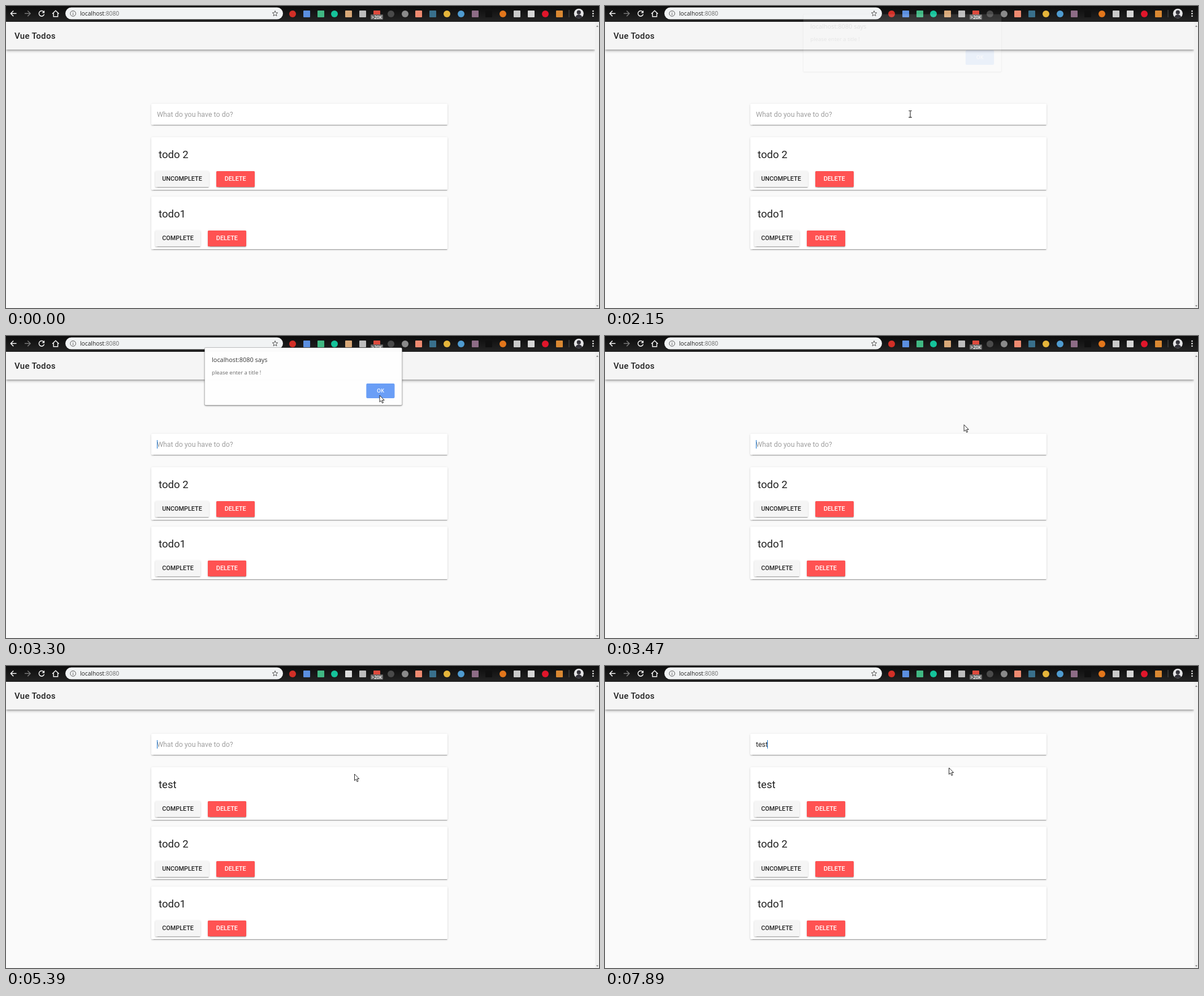
Write an HTML page with a canvas that moves like this. It is 1049 px wide and 534 px high and loops after 8 s.

```html
<!DOCTYPE html>
<html lang="en">
<head>
<meta charset="utf-8">
<title>Vue Todos</title>
<style>
  html, body { margin: 0; width: 100%; height: 100%; overflow: hidden; background: #fafafa; }
  #stage { position: relative; width: 1049px; height: 534px; overflow: hidden;
    font-family: Roboto, sans-serif; color: rgba(0,0,0,.87); white-space: nowrap; }
  #stage * { box-sizing: border-box; }
  .abs, #chrome, #bar, #app, #dialog, #dialog > *, #cursor, #cursor svg { position: absolute; left: 0; top: 0; }
  .ui { font-family: "Open Sans", sans-serif; }
  #stage #url { left: 131px; top: 3px; font-size: 10.25px; line-height: 20px; color: #222; }
  #url span { color: #6b6b6b; }
  .ext { position: absolute; width: 12px; height: 12px; top: 7.5px; }
  #stage #badge { left: 645px; top: 15px; width: 22px; height: 9px; background: #666; color: #fff;
    font-size: 8px; font-weight: 600; line-height: 9px; text-align: center; border-radius: 1px; }
  #stage #bar { top: 28px; width: 1042px; height: 49.4px; padding-left: 15px; background: #f5f5f5;
    font-size: 15px; font-weight: 500; letter-spacing: .3px; line-height: 50px;
    box-shadow: 0 1.5px 3px -.8px rgba(0,0,0,.3), 0 3px 4px rgba(0,0,0,.14), 0 .8px 7.8px rgba(0,0,0,.12); }
  #stage #scroll { left: 1042px; top: 28px; width: 7px; height: 506px; background: #f1f1f1; }
  #scroll i { position: absolute; left: 1.5px; border: 2.5px solid transparent; }
  #scroll i:first-child { top: 4px; border-bottom: 3px solid #8a8a8a; }
  #scroll i:last-child { bottom: 0; border-top: 3px solid #8a8a8a; }
  #stage #app { left: 257.2px; width: 523.6px; }
  .lift { border-radius: 1.5px;
    box-shadow: 0 2.3px .8px -1.5px rgba(0,0,0,.2), 0 1.5px 1.5px rgba(0,0,0,.14), 0 .8px 3.9px rgba(0,0,0,.12); }
  #field { position: relative; height: 37.2px; padding-left: 9.8px; margin-bottom: 22px;
    background: #fff; font-size: 12.4px; line-height: 37.2px; }
  #field.empty { color: rgba(0,0,0,.38); }
  #caret { position: absolute; top: 11.6px; width: 1px; height: 15px; background: #1976d2; }
  .card { height: 92.9px; margin-bottom: 12.4px; background: #fff; }
  .card h2 { margin: 0; padding-left: 12.8px; height: 60.4px; font-size: 18.6px; font-weight: 400; line-height: 62px; }
  .row { display: flex; padding-left: 6.6px; }
  .btn { height: 27.9px; min-width: 68.2px; padding: 0 12.4px; margin-right: 12.4px; background: #f5f5f5;
    font-size: 10.85px; font-weight: 500; line-height: 27.9px; text-align: center; }
  .btn.red { background: #ff5252; color: #fff; }
  #stage #dialog { left: 352px; top: 25px; width: 347.5px; height: 101px; background: #fff; border-radius: 2px;
    box-shadow: 0 0 0 .5px rgba(0,0,0,.3), 0 1px 3px rgba(0,0,0,.5); }
  #dialog .head { left: 12.5px; top: 11px; font-size: 10.9px; line-height: 20px; color: #333; }
  #dialog .note { left: 12.5px; top: 33.5px; font-size: 9.5px; line-height: 20px; color: #666; }
  #dialog .ok { left: 285px; top: 63px; width: 50.3px; height: 25.5px; border-radius: 2px; background: #689df6;
    color: #fff; font-size: 9px; font-weight: 600; line-height: 25px; text-align: center; }
</style>
</head>
<body>
<div id="stage">
  <canvas id="chrome" width="1049" height="28"></canvas>
  <div id="url" class="abs ui">localhost<span>:8080</span></div>
  <div id="exts"></div>
  <div id="badge" class="abs ui">&gt;20K</div>
  <div id="app">
    <div id="field" class="lift"><span id="text"></span><div id="caret"></div></div>
    <div id="list"></div>
  </div>
  <div id="bar">Vue Todos</div>
  <div id="scroll" class="abs"><i></i><i></i></div>
  <div id="dialog" class="ui">
    <div class="head">localhost:8080 says</div>
    <div class="note">please enter a title !</div>
    <div class="ok">OK</div>
  </div>
  <div id="cursor">
    <svg id="arrow" width="12" height="18" viewBox="-1 -1 12 18" style="left:-1px;top:-1px">
      <path d="M0 0V11.6L2.7 9.2L4.6 13.6L6.5 12.8L4.6 8.5H8.2Z" fill="#fff" stroke="#111" stroke-width=".9"/>
    </svg>
    <svg id="beam" width="8" height="14" viewBox="-4 -7 8 14" style="left:-4px;top:-7px">
      <path d="M-2.8 -5.7H-.6L0 -5.2L.6 -5.7H2.8M0 -5.2V5.4M-2.8 5.9H-.6L0 5.4L.6 5.9H2.8" fill="none" stroke="#222" stroke-width="1.1"/>
    </svg>
  </div>
</div>
<script>
const LOOP = 8000;
const TICK = 77;    // screen refresh while something moves
const BLINK = 530;  // caret half period
const $ = id => document.getElementById(id);
const clamp = v => Math.min(1, Math.max(0, v));
const ease = p => p * p * (3 - 2 * p);
const show = (el, on) => { el.style.display = on ? '' : 'none'; };

// Browser toolbar
function drawChrome() {
  const c = $('chrome').getContext('2d');
  const g = c.createLinearGradient(0, 0, 0, 28);
  g.addColorStop(0, '#0c0c0c');
  g.addColorStop(1, '#242424');
  c.fillStyle = g;
  c.fillRect(0, 0, 1049, 28);

  const line = (d, color, width = 1.5) => {
    c.strokeStyle = color;
    c.lineWidth = width;
    c.stroke(new Path2D(d));
  };
  const disc = (x, y, r, fill) => {
    c.fillStyle = fill;
    c.beginPath();
    c.arc(x, y, r, 0, 7);
    c.fill();
  };

  line('M18.5 13.3H8.5M13.2 8.5L8.4 13.3L13.2 18.1', '#f4f4f4');
  line('M33 13.3H43M38.3 8.5L43.1 13.3L38.3 18.1', '#777');
  line('M66.6 10.2A4.7 4.7 0 1 0 67.6 14.4', '#f4f4f4');
  c.fillStyle = '#f4f4f4';
  c.fill(new Path2D('M68.2 7.8V12.6H63.4Z'));
  line('M82 13.8L87.8 8.2L93.6 13.8M84 12.5V18.7H91.6V12.5', '#f4f4f4');

  c.fillStyle = '#f1f3f4';
  c.beginPath();
  c.roundRect(105, 2.6, 385, 21, 10.5);
  c.fill();

  line('M123.4 13.3A4.8 4.8 0 1 1 113.8 13.3A4.8 4.8 0 1 1 123.4 13.3M118.6 12.5V16M118.6 10.3V11.4', '#555', 1);
  let star = '';
  for (let i = 0; i < 10; i++) {
    const a = i * Math.PI / 5, r = i % 2 ? 2.2 : 5;
    star += (i ? 'L' : 'M') + (476 + r * Math.sin(a)) + ' ' + (13.5 - r * Math.cos(a));
  }
  line(star + 'Z', '#555', 1);

  line('M996 7V20', '#555', 1);
  disc(1013.3, 13.3, 8.5, '#e4e4e6');
  c.save();
  c.clip();
  disc(1013.3, 11.2, 3.6, '#33323a');
  disc(1013.3, 21, 6, '#33323a');
  c.restore();
  for (let i = -1; i <= 1; i++) disc(1038.5, 13.4 + i * 4.4, 1.3, '#eee');
}

// Extension buttons: squares, or discs where marked "o"
const exts = ('#d22f27o #5b8fe0 #41b883 #15c39ao #d8a878 #bdbdbd #dc4a3d #4a4a4ao #8a8a8ao #ee8a70 ' +
  '#39708c #e5b53ao #4f9bd0o #8d6c86 #101010 #e2761bo #c9c9c9 #d6d6d6 #e0162bo #d98832')
  .split(' ').map((spec, i) => {
    const el = document.createElement('div');
    el.className = 'ext';
    el.style.left = 501 + i * 24.82 + 'px';
    el.style.background = spec.slice(0, 7);
    el.style.borderRadius = spec.endsWith('o') ? '50%' : '1px';
    return $('exts').appendChild(el);
  });

// Todo cards
const cards = [['test', 'COMPLETE'], ['todo 2', 'UNCOMPLETE'], ['todo1', 'COMPLETE']].map(([title, action]) => {
  const el = document.createElement('div');
  el.className = 'card lift';
  el.innerHTML = `<h2>${title}</h2><div class="row"><div class="btn lift">${action}</div><div class="btn red lift">DELETE</div></div>`;
  return $('list').appendChild(el);
});

const FOCUS = 1050, ALERT = 2150, DISMISS = 3300, SUBMIT = 5310;

// Runs of typing: the first two letters come quickly, the rest at an even pace
const RUNS = [
  { word: 'test', start: 4310, pace: 230, end: SUBMIT },
  { word: 't', start: 6410, pace: 230, end: 7190 },
  { word: 'test', start: 7420, pace: 200, end: LOOP }
];

function typing(t) {
  const run = RUNS.find(r => t >= r.start && t < r.end);
  if (!run) return { text: '', stroke: -1 };
  const strokes = [...run.word].map((_, i) => run.start + (i && 70 + (i - 1) * run.pace));
  const done = strokes.filter(s => s <= t);
  return { text: run.word.slice(0, done.length), stroke: done.at(-1) };
}

// The caret blinks from the last focus, submit or keystroke on
function caretOn(t, stroke) {
  if (t < FOCUS || (t >= ALERT && t < DISMISS)) return false;
  const since = Math.max(stroke, ...[FOCUS, DISMISS, SUBMIT, RUNS[1].start].filter(e => e <= t));
  return Math.floor((t - since) / BLINK) % 2 === 0;
}

// The alert drops in while fading in, and leaves upwards
function alertPose(t) {
  const step = from => Math.floor((t - from) / TICK);
  if (t < ALERT) return { alpha: 0, rise: 0 };
  if (t < DISMISS) {
    const p = clamp((step(ALERT) + .3) / 2);
    return { alpha: p ** 1.2, rise: 12 * (1 - p) };
  }
  const p = clamp((step(DISMISS) + .7) / 2.1);
  return { alpha: 1 - p ** 3.5, rise: 12 * p };
}

// Each pointer move starts where the one before ended
const MOVES = [
  { start: 120, end: 820, to: [540, 191] },
  { start: 2760, end: 3230, to: [661, 105] },
  { start: 3390, end: 3530, to: [626, 175] },
  { start: 3610, end: 3760, to: [616.5, 191] },
  { start: 5860, end: 6010, to: [608.5, 180] }
];

function pointer(t) {
  const i = MOVES.findLastIndex(m => m.start <= t);
  if (i < 0) return null;
  const { start, end, to } = MOVES[i];
  const from = i ? MOVES[i - 1].to : [986, 531];
  const steps = Math.round((end - start) / TICK) + 1;
  const p = ease(clamp((Math.floor((t - start) / TICK) + 1) / steps));
  return from.map((v, k) => v + (to[k] - v) * p);
}

function render(t) {
  const { text, stroke } = typing(t);
  const added = t >= SUBMIT;
  const top = added ? 119.9 : 172.6;

  $('app').style.top = top + 'px';
  show(cards[0], added);
  $('field').className = text ? 'lift' : 'lift empty';
  $('text').textContent = text || 'What do you have to do?';
  const width = text ? $('text').getBoundingClientRect().width : 0;
  $('caret').style.left = 9.8 + Math.max(0, Math.round(width - .6)) + 'px';
  show($('caret'), caretOn(t, stroke));
  exts[4].style.background = t < RUNS[0].start ? '#d8a878' : '#dcdcdc';

  const { alpha, rise } = alertPose(t);
  $('dialog').style.opacity = alpha;
  $('dialog').style.transform = `translateY(${-rise}px) scale(${1 + rise * .0007})`;

  const pos = pointer(t);
  show($('cursor'), pos);
  if (pos) {
    const [x, y] = pos;
    const overField = x > 257 && x < 781 && y > top && y < top + 37.2;
    show($('beam'), overField);
    show($('arrow'), !overField);
    $('cursor').style.transform = `translate(${x}px, ${y}px)`;
  }
}

drawChrome();
const begin = performance.now();
function tick() {
  render((performance.now() - begin) % LOOP);
  requestAnimationFrame(tick);
}
tick();
</script>
</body>
</html>
```
